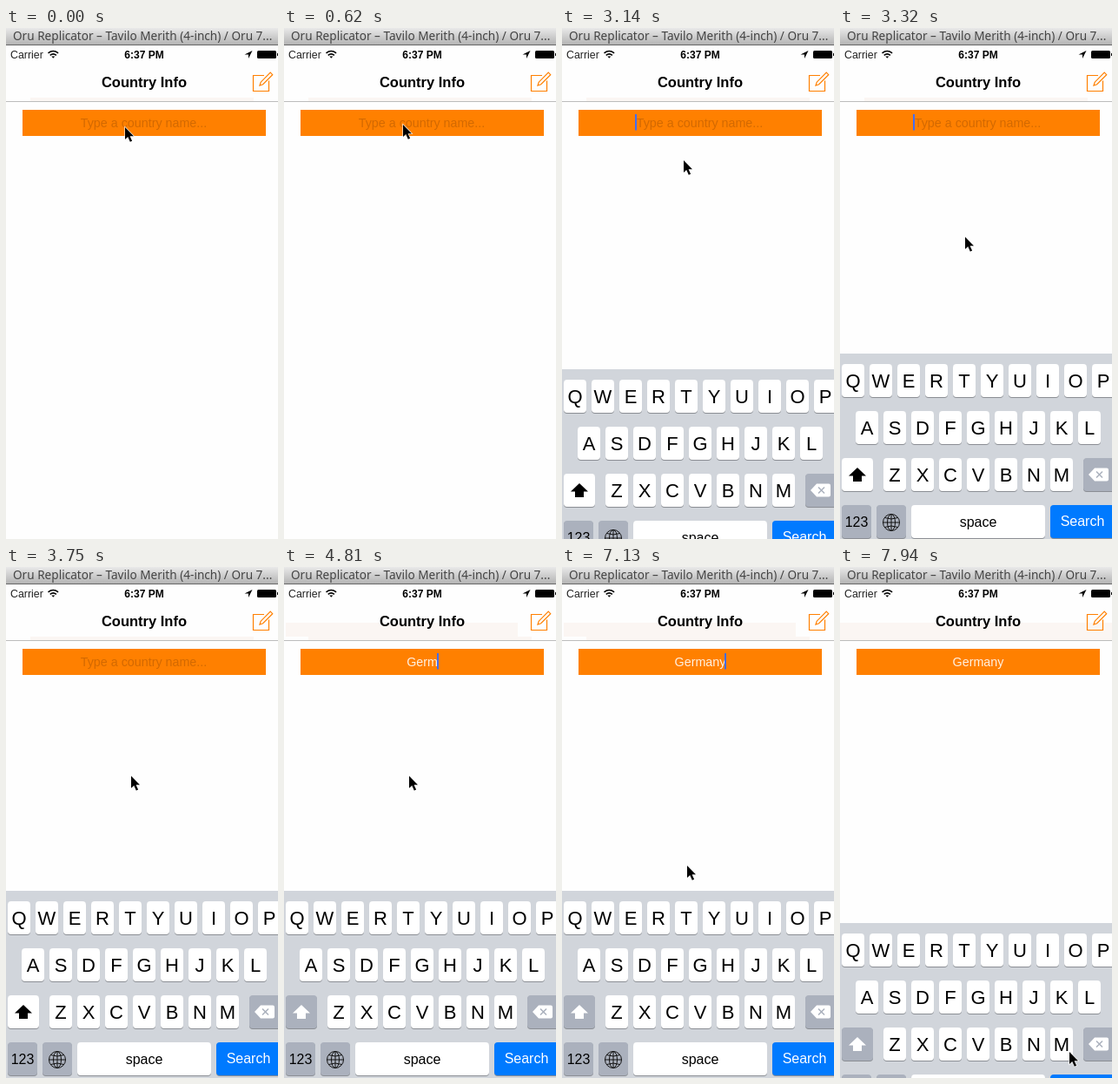
Write an HTML page that moves like this. It is 313x587 px and loops after 8000 ms.

```html
<!DOCTYPE html>
<html lang="en">
<head>
<meta charset="utf-8">
<title>Country Info</title>
<style>
  html, body { margin: 0; width: 100%; height: 100%; overflow: hidden; background: #fefefe; }
  svg { display: block; font-family: "Liberation Sans", Arial, sans-serif; }
  .mid { text-anchor: middle; }
  .field { font-size: 14.3px; }
  .letter { font-size: 22px; }
  .word { font-size: 16px; }
</style>
</head>
<body>
<svg width="313" height="587" viewBox="0 0 313 587">
  <defs>
    <linearGradient id="chrome" x2="0" y2="1">
      <stop stop-color="#e9e9e9"/><stop offset="1" stop-color="#b4b4b4"/>
    </linearGradient>
  </defs>
  <rect width="313" height="587" fill="#fefefe"/>

  <rect width="313" height="19" fill="url(#chrome)"/>
  <rect y="19" width="313" height="1" fill="#686868"/>
  <text x="8" y="14" font-size="13.6" fill="#444" style="font-family:'Noto Sans',sans-serif">Oru Replicator – Tavilo Merith (4-inch) / Oru 7...</text>

  <!-- Status and navigation bars -->
  <rect id="glow" fill="#fbf6f3"/>
  <rect x="28" y="80" width="257" height="4" fill="#fbf6f3"/>
  <text x="5" y="35" font-size="12.4" fill="#222">Carrier</text>
  <g fill="none" stroke="#000" stroke-width="1.6">
    <path d="M48.5 28.8q5.800-4.600 11.600 0M50.700 31.300q3.600-2.800 7.200 0"/>
    <path d="M52.300 32.500h4l-2 2.200z" fill="#000" stroke="none"/>
  </g>
  <text class="mid" x="159" y="35" font-size="12" font-weight="bold">6:37 PM</text>
  <path d="M283.500 26l-9 4.500h4.500v4.500z"/>
  <rect x="289" y="26" width="22" height="9" rx="1.500"/>
  <rect x="312" y="29" width="1" height="3"/>
  <text class="mid" x="159" y="68" font-size="16.5" font-weight="bold">Country Info</text>
  <g fill="none" stroke="#ff8000" stroke-width="1.200">
    <path d="M297 54.500h-12.500v18h18v-12"/>
    <path d="M292 66l1.200-3.800 11-11 2.500 2.500-11 11z"/>
  </g>
  <rect y="84" width="313" height="1" fill="#bcbcbc"/>

  <!-- Search field -->
  <rect x="19" y="94" width="280" height="30" fill="#ff8000"/>
  <text id="hint" class="mid field" x="158.500" y="114" fill="#d36900">Type a country name...</text>
  <text id="typed" class="mid field" x="159" y="114" fill="#fff0e0"></text>
  <rect id="caret" y="99" width="2" height="18.500" fill="#456df0"/>

  <g id="keyboard"></g>
  <path id="pointer" d="M0 0v14l3.200-3 2.600 5.700 2.300-1-2.500-5.500h4.400z" fill="#000" stroke="#fff" stroke-width="1.200" paint-order="stroke"/>
</svg>
<script>
const $ = id => document.getElementById(id);
const GREY = '#abb1bd';

const key = (x, y, w, fill, attrs = '') =>
  `<rect x="${x}" y="${y + 1}" width="${w}" height="38" rx="4" fill="#8b8e94"/>
   <rect ${attrs} x="${x}" y="${y}" width="${w}" height="38" rx="4" fill="${fill}"/>`;
const label = (x, y, text, cls, fill = '#000') =>
  `<text class="mid ${cls}" x="${x}" y="${y}" fill="${fill}">${text}</text>`;
const row = (letters, x, y) => [...letters].map((c, i) =>
  key(x + 32 * i, y, 26, '#fff') + label(x + 32 * i + 13, y + 27, c, 'letter')).join('');

// Keyboard coordinates are relative to its top edge
$('keyboard').innerHTML =
  '<rect width="313" height="216" fill="#d1d5db"/>' +
  row('QWERTYUIOP', 2, 12) + row('ASDFGHJKL', 18, 66) + row('ZXCVBNM', 50, 120) +
  key(2, 120, 36, '#fff', 'id="shift"') +
  '<path id="arrow" d="M20 131l10 9.500h-5v6.500h-10v-6.500h-5z"/>' +
  key(280, 120, 36, GREY) +
  '<path d="M286 139l7-7.500h14q2 0 2 2v11q0 2-2 2h-14z" fill="#fff"/>' +
  `<path d="M295 135.500l7 7m0-7l-7 7" stroke="${GREY}" stroke-width="1.500"/>` +
  key(2, 174, 34, GREY) + label(19, 199, '123', 'word') +
  key(42, 174, 34, GREY) +
  `<g fill="none" stroke="#111"><circle cx="59" cy="194" r="9.500"/>
   <ellipse cx="59" cy="194" rx="4.500" ry="9.500"/>
   <path d="M59 184.500v19M49.500 194h19M51.500 188.500q7.500 3 15 0M51.500 199.500q7.500-3 15 0"/></g>` +
  key(82, 174, 154, '#fff') + label(159, 199, 'space', 'word') +
  key(242, 174, 76, '#007aff') + label(279, 198, 'Search', 'word', '#fff');

const LOOP = 8000, OPEN = 3050, LEAVE = 7130, CLOSE = 7760;
const keystrokes = [4110, 4370, 4450, 4810, 5260, 5430, 5790];
const caretFades = [[0, 0], [3140, 1], [3570, .6], [3660, .3], [3750, 0], [4110, 1],
  [6330, .6], [6420, .3], [6510, 0], [6860, .5], [6950, 1], [7400, .6], [7490, .3], [7580, 0]];
const idlePointer = [[0, 137, 114], [180, 137, 117], [270, 137, 119], [540, 137, 115], [620, 137, 111]];

const held = (list, t) => list.filter(k => k[0] <= t).pop();
const ticks = (t, start, step) => Math.floor((t - start) / step);

function pointerAt(t) {
  if (t >= 7940) return [264, 557];
  if (t >= LEAVE) {
    const rest = (1 - Math.min(5, ticks(t, LEAVE, 90)) / 5) ** 2;
    return [264 - 120 * rest, 570 - 227 * rest];
  }
  if (t >= 6950) return [144, 240];
  if (t >= OPEN) {
    const p = Math.min(1, ticks(t, OPEN, 87.5) / 3), s = p * p * (3 - 2 * p);
    return [138 + 6 * s, 121 + 119 * s];
  }
  return held(idlePointer, t).slice(1);
}

function keyboardTop(t) {
  if (t < OPEN) return 587;
  if (t >= CLOSE) return 372 + 37 * (ticks(t, CLOSE, 90) / 2) ** 2;
  return Math.round(372 + 63 * Math.exp(-ticks(t, OPEN, 87.5) * 1.14));
}

function draw(now) {
  const t = now % LOOP;
  const text = 'Germany'.slice(0, keystrokes.filter(k => k <= t).length);
  $('typed').textContent = text;
  $('hint').style.display = text ? 'none' : '';
  $('caret').setAttribute('x', text ? Math.round(158 + $('typed').getComputedTextLength() / 2) : 84);
  $('caret').setAttribute('opacity', held(caretFades, t)[1]);

  const lower = t >= 4190;
  $('shift').setAttribute('fill', lower ? GREY : '#fff');
  $('arrow').setAttribute('fill', lower ? '#fff' : '#000');

  const closing = t >= CLOSE;
  const glow = { x: closing ? 0 : 2, y: 64, width: closing ? 313 : 267, height: text ? (closing ? 20 : 16) : 0 };
  for (const name in glow) $('glow').setAttribute(name, glow[name]);

  $('keyboard').setAttribute('transform', `translate(0 ${keyboardTop(t)})`);
  $('pointer').setAttribute('transform', `translate(${pointerAt(t).map(Math.round)})`);
  requestAnimationFrame(() => draw(performance.now() - start));
}
const start = performance.now();
draw(0);
</script>
</body>
</html>
```
